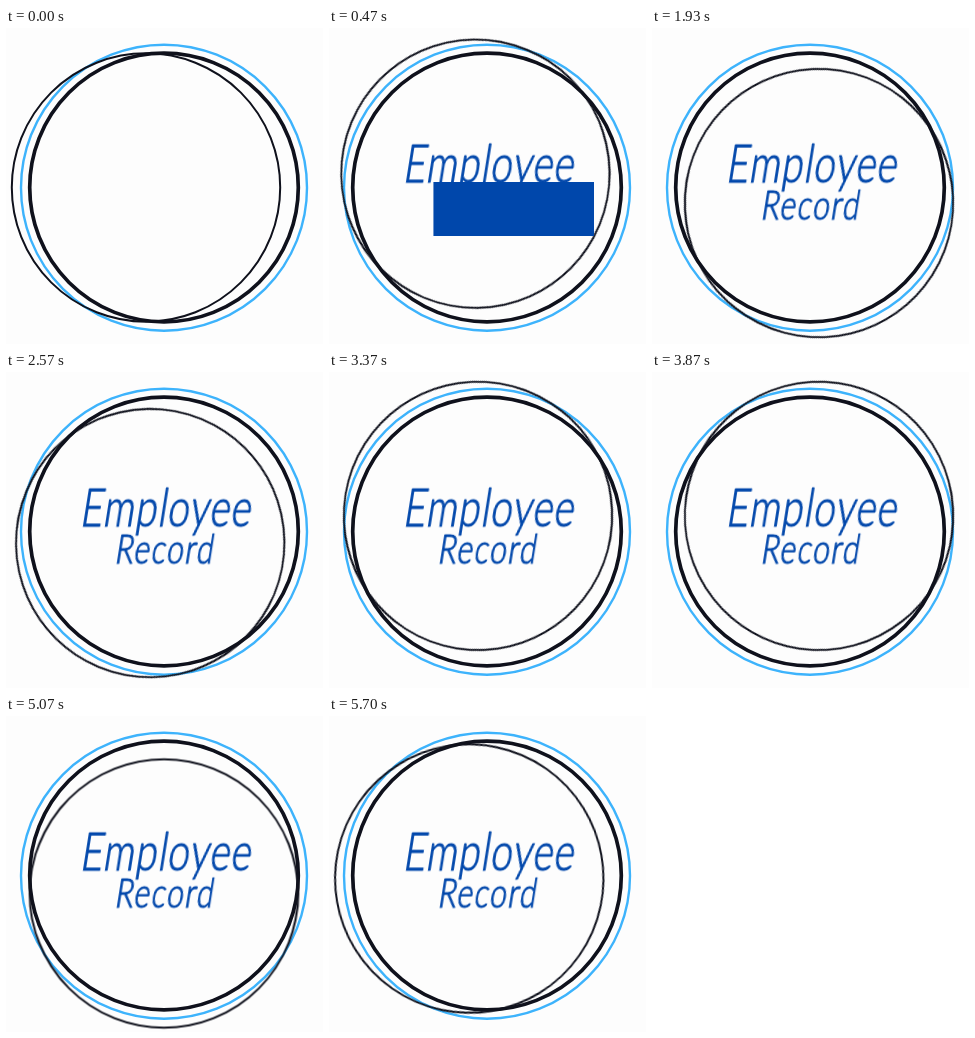
These frames come from a looping animation (317 px wide and 316 px high, 5730 ms). An HTML page:

```html
<!DOCTYPE html>
<html lang="en">
<head>
<meta charset="utf-8">
<title>Employee Record</title>
<style>
  html, body { margin: 0; width: 100%; height: 100%; overflow: hidden; background: #fdfdfd; }
  svg { display: block; width: 100vw; height: 100vh; }
  circle { fill: none; stroke: #0f111c; }
  text {
    font-family: Lato, "Open Sans", sans-serif;
    font-weight: 300;
    fill: #0047ab;
    stroke: #0047ab;
    stroke-width: 1.1;
    stroke-linejoin: round;
  }
  .block { fill: #0047ab; transform-box: fill-box; transform-origin: 0 0; }
  #orbit { transform-origin: 158px 159.5px; }
</style>
</head>
<body>
<svg viewBox="0 0 317 316">
  <circle cx="158" cy="159.7" r="143" style="stroke:#3db3fc" stroke-width="2.4"/>
  <circle cx="158" cy="159.5" r="134.3" stroke-width="3.7"/>
  <g id="orbit"><circle cx="140" cy="159.5" r="134.2" stroke-width="2"/></g>

  <!-- condensed, slanted lettering -->
  <g transform="translate(73.4 154) skewX(-9) scale(.75 1)">
    <text id="word1" font-size="51.6" letter-spacing="1.4">Employee</text>
  </g>
  <g transform="translate(108.2 191) skewX(-9) scale(.75 1)">
    <text id="word2" font-size="40" letter-spacing="2.1">Record</text>
  </g>

  <rect id="block1" class="block" x="52" y="100" width="213" height="54"/>
  <rect id="block2" class="block" x="52" y="154" width="213" height="54"/>
</svg>
<script>
  const LOOP = 5730;
  const EASE = 'cubic-bezier(.37, 0, .63, 1)';
  const $ = id => document.getElementById(id);
  const play = (id, frames, easing = 'linear') =>
    $(id).animate(frames, { duration: LOOP, iterations: Infinity, easing });

  // A block grows from the left, uncovers its word and shrinks to the right.
  function reveal(n, start, full, end) {
    const bar = (ms, x, scale, easing = 'linear') =>
      ({ offset: ms / LOOP, transform: `translateX(${x}px) scaleX(${scale})`, easing });
    play('block' + n, [
      bar(0, 0, 0), bar(start, 0, 0, EASE), bar(full, 0, 1, EASE),
      bar(end, 213, 0), bar(LOOP, 213, 0)
    ]);
    play('word' + n, [
      { offset: 0, opacity: 0 }, { offset: full / LOOP, opacity: 0 },
      { offset: full / LOOP, opacity: 1 }, { offset: 1, opacity: 1 }
    ]);
  }

  // Two turns per loop, in steps of ten degrees.
  play('orbit', [{ transform: 'rotate(0deg)' }, { transform: 'rotate(720deg)' }], 'steps(72)');
  reveal(1, 70, 225, 400);
  reveal(2, 200, 392, 630);
</script>
</body>
</html>
```
